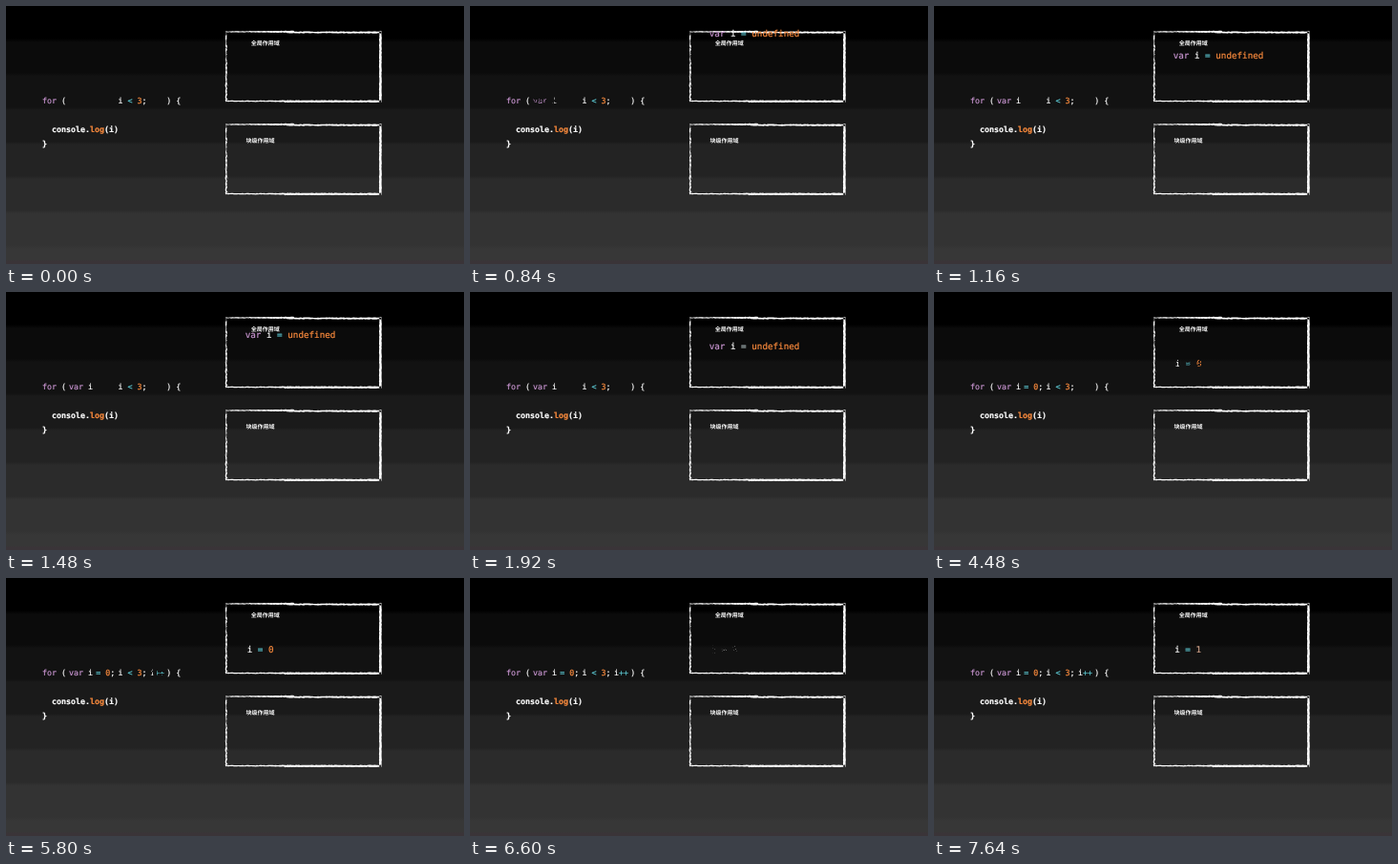
These frames come from a looping animation (480x270 px, 8 s). An HTML page with a canvas:

```html
<!DOCTYPE html>
<html lang="zh">
<head>
<meta charset="utf-8">
<title>Scope of a loop variable</title>
<style>
  html, body {
    margin: 0;
    width: 100%;
    height: 100%;
    overflow: hidden;
    background: #000;
  }
  body {
    position: relative;
    background: linear-gradient(
      #000 34px, #0b0b0b 38px 70px, #121212 73px 106px, #1a1a1a 109px 142px,
      #232323 145px 178px, #2b2b2b 181px 214px, #333 217px 250px, #373737 254px 266px, #3a3438 267px);
  }
  svg, canvas {
    position: absolute;
    left: 0;
    top: 0;
    width: 480px;
    height: 270px;
  }
  text {
    font: 8.3px "DejaVu Sans Mono", monospace;
    white-space: pre;
    text-rendering: geometricPrecision;
    color: #fff;
  }
  text, tspan {
    fill: currentColor;
    stroke: currentColor;
    stroke-width: 0.2px;
  }
  .bold { font-weight: 700; }
  .title { font: 700 6px "Noto Sans CJK SC", "Noto Sans CJK", sans-serif; stroke: none; }
  .key { color: #c794cf; }
  .op { color: #5cc8d2; }
  .num { color: #fb8b3d; }
</style>
</head>
<body>
<svg id="stage" viewBox="0 0 480 270">
  <path id="frame" fill="#fff"/>
  <use href="#frame" y="97"/>
  <text class="title" x="256.8" y="41.3">全局作用域</text>
  <text class="title" x="251.4" y="143.3">块级作用域</text>
  <text x="38" y="102"><tspan class="key">for</tspan> (</text>
  <text x="117.4" y="102">i <tspan class="op">&lt;</tspan> <tspan class="num">3</tspan>;</text>
  <text x="168.3" y="102">) {</text>
  <text class="bold" x="48" y="132">console.<tspan class="num">log</tspan>(i)</text>
  <text class="bold" x="38" y="147">}</text>
</svg>
<canvas id="grains" width="480" height="270"></canvas>
<script>
const LOOP = 8000, STEP = 40;
const KEY = "#c794cf", OP = "#5cc8d2", NUM = "#fb8b3d", WHITE = "#fff";
const SVG = "http://www.w3.org/2000/svg";
const stage = document.getElementById("stage");
const ctx = document.getElementById("grains").getContext("2d");

function random(seed) {
  return () => {
    seed = (seed * 1664525 + 1013904223) % 4294967296;
    return seed / 4294967296;
  };
}

// One brush stroke, its width going from w0 to w1 with ragged sides.
function stroke(x, y, length, vertical, w0, w1, ragged, rnd) {
  const near = [], far = [];
  for (let s = 0; s <= length; s += 1.5) {
    const half = (w0 + (w1 - w0) * s / length) / 2;
    const a = -half - (rnd() - 0.5) * ragged;
    const b = half + (rnd() - 0.5) * ragged;
    const at = off => (vertical ? [x + off, y + s] : [x + s, y + off]).map(n => n.toFixed(2)).join(" ");
    near.push(at(a));
    far.unshift(at(b));
  }
  return "M" + near.concat(far).join("L") + "Z";
}

function drawFrame() {
  const rnd = random(7);
  document.getElementById("frame").setAttribute("d", [
    stroke(230, 26.9, 72, false, 0.9, 2, 0.5, rnd),
    stroke(294, 27.6, 100, false, 1.6, 2, 0.5, rnd),
    stroke(230, 99.6, 70, false, 1.1, 1.6, 0.5, rnd),
    stroke(292, 99.8, 102, false, 2.2, 2.1, 0.5, rnd),
    stroke(230.6, 27, 73, true, 0.6, 1.3, 0.8, rnd),
    stroke(231.7, 28, 71, true, 0.1, 0.5, 0.7, rnd),
    stroke(392.4, 26, 75, true, 2.4, 2.6, 0.5, rnd)
  ].join(""));
}

// show and hide are [start, end] times of the dissolves.
const items = [
  { x: 66, y: 102, size: 8.3, show: [520, 1080],
    runs: [["var ", KEY], ["i", WHITE]] },
  { x: 250.7, y: 59.5, size: 9.25, drop: 520, hide: [3400, 3800], spread: 5.5, rise: 26,
    runs: [["var ", KEY], ["i ", WHITE], ["= ", OP], ["undefined", NUM]] },
  { x: 94.2, y: 102, size: 8.3, show: [2600, 3240],
    runs: [["= ", OP], ["0", NUM], [";", WHITE]] },
  { x: 252.7, y: 78, size: 9.25, show: [4040, 4680], hide: [6280, 6680], spread: 2, rise: 0,
    runs: [["i ", WHITE], ["= ", OP], ["0", NUM]] },
  { x: 150.9, y: 102, size: 8.3, show: [5480, 6040],
    runs: [["i", WHITE], ["++", OP]] },
  { x: 252.2, y: 78, size: 9.25, show: [6920, 7640],
    runs: [["i ", WHITE], ["= ", OP], ["1", "#cfa088"]] }
];

function addText(item) {
  const text = document.createElementNS(SVG, "text");
  text.setAttribute("x", item.x);
  text.setAttribute("y", item.y);
  text.style.fontSize = item.size + "px";
  for (const [string, color] of item.runs) {
    const span = document.createElementNS(SVG, "tspan");
    span.textContent = string;
    span.style.color = color;
    text.append(span);
  }
  item.node = stage.appendChild(text);
}

// Split the text into its lit pixels, each with its own random numbers.
function makeGrains(item) {
  const pad = document.createElement("canvas");
  pad.width = 480;
  pad.height = 270;
  const c = pad.getContext("2d");
  c.textRendering = "geometricPrecision";
  c.font = item.size + 'px "DejaVu Sans Mono", monospace';
  let x = item.x;
  for (const [string, color] of item.runs) {
    c.fillStyle = color;
    c.fillText(string, x, item.y);
    x += string.length * item.size * 0.602;
  }
  const left = Math.floor(item.x) - 1, top = Math.floor(item.y) - 9;
  const w = Math.ceil(x) + 1 - left, h = 13;
  const { data } = c.getImageData(left, top, w, h);
  const rnd = random(31);
  const grains = [];
  for (let i = 0; i < w * h; i++) {
    const [r, g, b, a] = data.subarray(i * 4, i * 4 + 4);
    if (a < 40) continue;
    grains.push({
      x: left + i % w, y: top + Math.floor(i / w),
      rgb: `rgb(${r},${g},${b})`, alpha: a / 255,
      order: rnd(), dx: rnd() * 2 - 1, dy: rnd() * 2 - 1, rise: rnd() ** 8
    });
  }
  return grains;
}

function gather(item, p) {
  for (const g of item.grains) {
    const k = Math.min(1, Math.max(0, (p * 1.25 - g.order) * 4));
    ctx.globalAlpha = g.alpha * k;
    ctx.fillStyle = g.rgb;
    ctx.fillRect(g.x, g.y, 1, 1);
  }
}

function scatter(item, p) {
  ctx.fillStyle = WHITE;
  const drift = p ** 3;
  for (const g of item.grains) {
    const k = Math.min(1, Math.max(0, (1 - p * 0.9 - g.order) * 4));
    ctx.globalAlpha = g.alpha * k;
    ctx.fillRect(
      Math.round(g.x + g.dx * item.spread * drift),
      Math.round(g.y + (g.dy * item.spread - g.rise * item.rise) * drift), 1, 1);
  }
}

// Height above rest of a text that falls and bounces.
function bounce(t) {
  const pull = 342;
  let s = (t - 1125) / 1000;
  if (s < 0) return pull * s * s;
  for (let half = 0.225; half > 0.01; half *= 0.45) {
    if (s < 2 * half) return pull * (half * half - (s - half) ** 2);
    s -= 2 * half;
  }
  return 0;
}

const progress = (t, [start, end]) => (t - start + STEP) / (end - start + STEP);

function draw(t) {
  ctx.clearRect(0, 0, 480, 270);
  for (const item of items) {
    const p = item.show ? progress(t, item.show) : t >= item.drop ? 1 : 0;
    const q = item.hide ? progress(t, item.hide) : 0;
    item.node.style.display = p >= 1 && q <= 0 ? "" : "none";
    if (p > 0 && p < 1) gather(item, p);
    if (q > 0 && q < 1) scatter(item, q);
    if (item.drop) {
      item.node.setAttribute("y", item.y - bounce(t));
      item.node.children[2].style.color = t < 1900 ? OP : "#a9b6b8";
    }
  }
  ctx.globalAlpha = 1;
}

drawFrame();
for (const item of items) {
  addText(item);
  item.grains = makeGrains(item);
}

const begin = performance.now();
function tick() {
  const t = (performance.now() - begin) % LOOP;
  draw(Math.floor(t / STEP) * STEP);
  requestAnimationFrame(tick);
}
tick();
</script>
</body>
</html>
```
